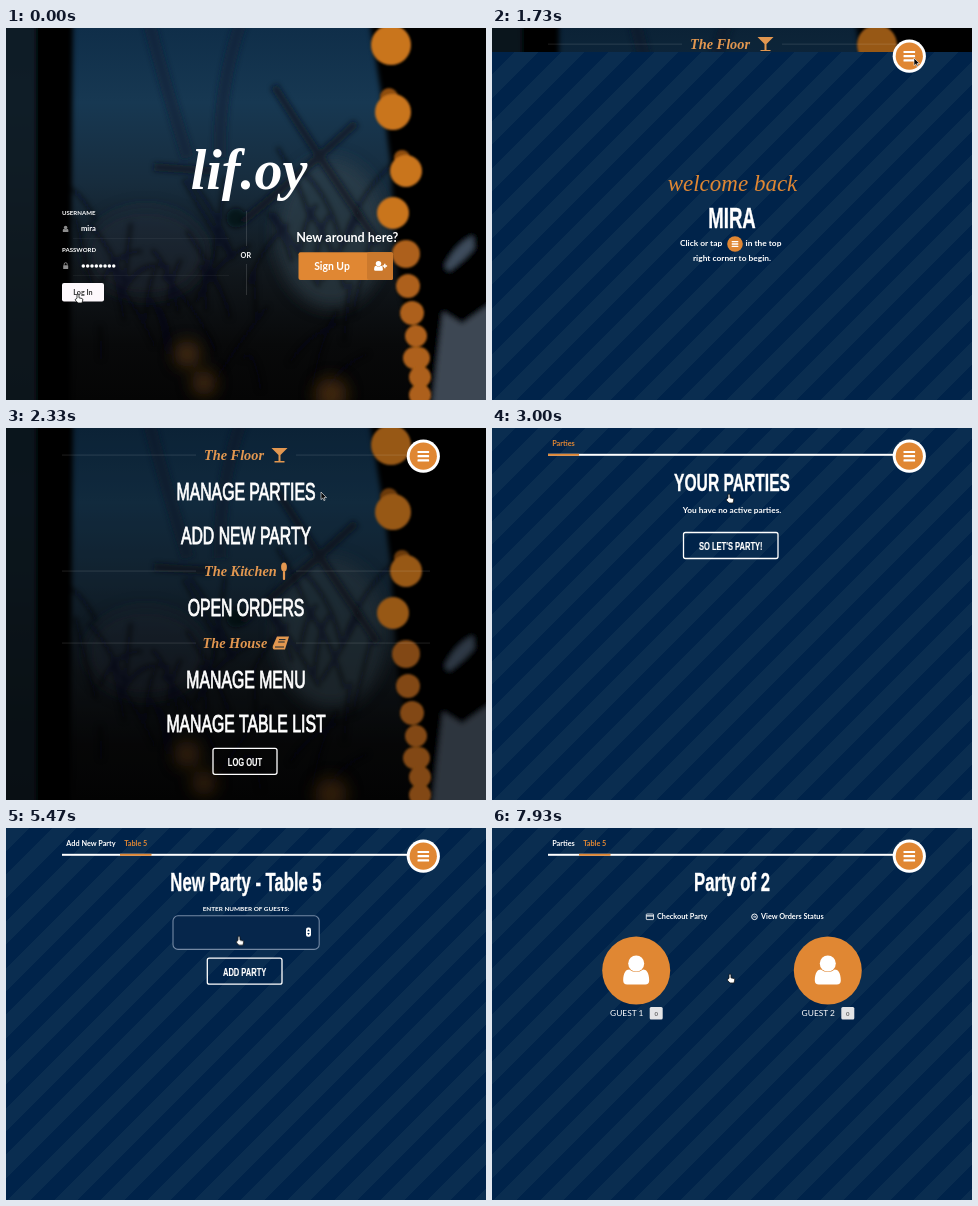
Animation, 480 px wide and 372 px high, one loop 8000 ms. Source, as an HTML page:

```html
<!DOCTYPE html>
<html lang="en">
<head>
<meta charset="utf-8">
<title>Restaurant floor app</title>
<style>
html, body { margin: 0; width: 100%; height: 100%; overflow: hidden; background: #00234a; }
#stage { position: relative; width: 480px; height: 372px; overflow: hidden;
  background: repeating-linear-gradient(135deg, #0a2d50 0 16.5px, #00234a 16.5px 33px); }
.layer { position: absolute; left: 0; top: 0; width: 480px; height: 372px; }
text { font-family: Lato, sans-serif; font-weight: 700; fill: #fff; }
.cond { font-family: "Liberation Sans", Arial, sans-serif; text-anchor: middle;
  stroke: #fff; stroke-width: .016em; }
.thin { font-weight: 400; stroke-width: .04em; }
.script { font-family: "Liberation Serif", serif; font-style: italic; }
.mid { text-anchor: middle; }
.plain { font-weight: 400; }
</style>
</head>
<body>
<div id="stage"></div>
<script>
const LOOP = 8000, ORANGE = '#e08733', NAVY = '#00234a';
const stage = document.getElementById('stage');

// Drawing helpers, each returning SVG markup
const text = (x, y, size, str, cls = '', fill = '#fff') =>
  `<text x="${x}" y="${y}" font-size="${size}" class="${cls}" style="fill:${fill}">${str}</text>`;
const cond = (x, y, size, str, cls = '') =>
  `<text class="cond ${cls}" font-size="${size}" transform="translate(${x} ${y}) scale(.64 1)">${str}</text>`;
const rect = (x, y, w, h, fill, r = 0, extra = '') =>
  `<rect x="${x}" y="${y}" width="${w}" height="${h}" rx="${r}" fill="${fill}" ${extra}/>`;
const circle = (x, y, r, fill, extra = '') =>
  `<circle cx="${x}" cy="${y}" r="${r}" fill="${fill}" ${extra}/>`;
const path = (d, fill, extra = '') => `<path d="${d}" fill="${fill}" ${extra}/>`;
const line = (d, color, width, opacity = 1) =>
  path(d, 'none', `stroke="${color}" stroke-width="${width}" opacity="${opacity}"`);
const group = (x, y, body, scale = 1) =>
  `<g transform="translate(${x} ${y}) scale(${scale})">${body}</g>`;
const outlined = (x, y, w, label) =>
  rect(x, y, w, 26, 'none', 2, 'stroke="#fff" stroke-width="1.3"') +
  cond(x + w / 2, y + 17.4, 11.8, label);
const user = (x, y, scale, fill) => group(x, y, circle(0, -7, 8, fill) +
  path('M-13 10c0-8 3-11 6-11q7 5 14 0c3 0 6 3 6 11q0 4-4 4h-18q-4 0-4-4z', fill), scale);
const burger = (x, y, scale) => group(x, y,
  [-4.2, 0, 4.2].map(dy => rect(-5.8, dy - 1.1, 11.6, 2.2, '#fff', .6)).join(''), scale);

function layer(body) {
  stage.insertAdjacentHTML('beforeend', `<svg class="layer" viewBox="0 0 480 372">${body}</svg>`);
  return stage.lastElementChild;
}

// steps: [ms, value, easing?]; the ends of the loop are held
function track(el, prop, steps) {
  const all = [[0, steps[0][1]], ...steps, [LOOP, steps[steps.length - 1][1]]];
  el.animate(all.map(([ms, value, easing = 'linear']) =>
    ({ offset: ms / LOOP, [prop]: value, easing })), { duration: LOOP, iterations: Infinity });
}
const show = (el, from, to, fadeIn = 0, fadeOut = 0) => track(el, 'opacity',
  [[from, 0], [from + fadeIn, 1], [to, 1], [to + fadeOut, 0]]);

function photo() {
  let seed = 11;
  const rnd = () => (seed = seed * 16807 % 2147483647) / 2147483647;
  let twigs = '';
  for (let i = 0; i < 40; i++) {
    const x = 90 + rnd() * 270, y = 190 + rnd() * 180, dx = rnd() * 110 - 55;
    twigs += `M${x} ${y}q${dx / 3} ${-20 - rnd() * 30} ${dx} ${-30 - rnd() * 60}`;
  }
  const bulbs = [[385, 17, 20], [387, 84, 18], [400, 143, 16], [387, 185, 16], [400, 226, 14],
    [402, 258, 12], [406, 285, 12], [410, 308, 11], [413, 330, 11], [408, 330, 11], [414, 349, 11],
    [414, 367, 11]];
  const ember = (x, y, r) => circle(x, y, r, '#6b4012', 'opacity=".6"');
  return rect(0, 0, 480, 372, 'url(#sky)') +
    '<g filter="url(#haze)">' +
    '<ellipse cx="325" cy="205" rx="55" ry="75" fill="#34434f" opacity=".6"/>' +
    '<ellipse cx="140" cy="225" rx="60" ry="45" fill="#28333c" opacity=".4"/></g>' +
    '<g filter="url(#blur)">' +
    line(twigs, '#080d12', 4, .5) +
    line('M142-9Q160 60 182 130M236-9Q212 60 214 130', '#0d2233', 13, .55) +
    line('M148 139L206 143M268 58Q320 140 372 215M235 195Q290 150 350 95', '#0b1721', 8, .65) +
    circle(230, 190, 10, '#070c11', 'opacity=".7"') +
    rect(-9, -9, 39, 390, '#0a1522', 0, 'opacity=".85"') +
    path('M30-9H67L64 380H30z', '#030405') +
    path('M363-9L376 70 384 130 392 250 420 380H490V-9z', '#040506') +
    path('M437 284L456 296 490 272V380H426z', '#3c4753') +
    path('M439 238Q450 216 467 208L468 220Q458 232 443 243z', '#3d4b5b') + '</g>' +
    '<g filter="url(#haze)">' + ember(181, 326, 13) + ember(198, 355, 12) + ember(325, 366, 16) + '</g>' +
    '<g filter="url(#soft)">' +
    circle(383, 69, 9, '#8f4d11') + circle(396, 130, 8, '#8f4d11') +
    bulbs.map(([x, y, r], i) => circle(x, y, r, i < 4 ? '#c9751f' : '#ad611a')).join('') + '</g>';
}

layer(`<defs>
  <linearGradient id="sky" x2="0" y2="1">
    <stop offset="0" stop-color="#0f2e49"/><stop offset=".2" stop-color="#173852"/>
    <stop offset=".42" stop-color="#172c3d"/><stop offset=".65" stop-color="#11171c"/>
    <stop offset=".85" stop-color="#08090a"/><stop offset="1" stop-color="#050505"/>
  </linearGradient>
  <filter id="blur"><feGaussianBlur stdDeviation="2.5"/></filter>
  <filter id="haze" x="-50%" y="-50%" width="200%" height="200%"><feGaussianBlur stdDeviation="8"/></filter>
  <filter id="soft"><feGaussianBlur stdDeviation=".8"/></filter>
</defs>`);

// Striped pages: tabs switch hard, the content fades in
function page(from, to, fade, tabs, active, content) {
  let x = 56;
  let bar = tabs.length ? rect(56, 25.8, 346, 2, '#fff') : '';
  tabs.forEach(([label, width], i) => {
    const on = i === active;
    bar += text(x + width / 2, 18, 7.3, label, 'mid', on ? ORANGE : '#fff');
    if (on) bar += rect(x, 25.8, width, 2, ORANGE);
    x += width;
  });
  show(layer(bar), from, to);
  const el = layer(content);
  show(el, from, to, fade);
  return el;
}
const PARTIES = ['Parties', 31], ADD = ['Add New Party', 58], TABLE = ['Table 5', 31.5];

page(400, 2670, 500, [], 0,
  text(240.5, 163, 23, 'welcome back', 'script mid plain', ORANGE) +
  cond(240, 200, 29, 'MIRA') +
  text(188, 218, 8.4, 'Click or tap') + circle(243, 216, 7.8, ORANGE) + burger(243, 216, .58) +
  text(253.5, 218, 8.4, 'in the top') + text(240, 233, 8.4, 'right corner to begin.', 'mid'));

page(2670, 3600, 200, [PARTIES], 0,
  cond(240, 62.5, 24.4, 'YOUR PARTIES') +
  text(240, 85, 8.3, 'You have no active parties.', 'mid') +
  outlined(191.5, 104.5, 94.5, "SO LET'S PARTY!"));

const table = (x, name, seats, fill) =>
  `<ellipse cx="${x}" cy="108" rx="32.6" ry="31" fill="${fill}" stroke="${ORANGE}" stroke-width=".9"/>` +
  text(x, 103, 9.4, name, 'mid', '#17171a') +
  text(x, 112.3, 7.1, `Seats: ${seats}`, 'mid plain', '#4c4641') +
  rect(x - 32, 122.3, 64, 15.8, ORANGE, 1) + text(x, 132.5, 6.2, 'Free', 'mid');
const tables = page(3600, 5000, 400, [ADD], 0,
  cond(240, 63, 26, 'Select a Table') +
  table(199.7, 'Table 5', 8, '#f5dcc5') +
  `<g class="hover">${table(199.7, 'Table 5', 8, '#cfbfb2')}</g>` +
  table(280.2, 'Table 1', 4, '#f5dcc5'));
show(tables.querySelector('.hover'), 4330, 5000, 150);

const form = page(5000, 7050, 350, [ADD, TABLE], 1,
  cond(240, 63, 26, 'New Party - Table 5') +
  text(240, 82.5, 6.4, 'ENTER NUMBER OF GUESTS:', 'mid') +
  rect(167, 87.8, 146.2, 33.6, '#06264b', 5, 'stroke="#7489a4" stroke-width="1.1"') +
  `<g class="value">${text(236, 109, 13.5, '2', 'mid plain')}</g>` +
  `<g class="caret">${rect(239.6, 97, .9, 15, '#d5dde6')}</g>` +
  rect(300, 99.5, 5, 9.2, '#fff', 2) +
  path('M301.2 103.2l1.3-2 1.3 2zM301.2 105l1.3 2 1.3-2z', NAVY) +
  outlined(201.3, 130.2, 74.7, 'ADD PARTY'));
show(form.querySelector('.value'), 6000, 7050);
show(form.querySelector('.caret'), 5670, 7050);

const guest = (x, n) => circle(x, 142.5, 34, ORANGE) + user(x, 142.5, 1, '#fff') +
  text(x - 9.5, 188, 8.4, `GUEST ${n}`, 'mid plain') +
  rect(x + 13.5, 179, 13, 12.6, '#e3e4e6', 1.5) + text(x + 20, 187.6, 6, '0', 'mid', '#666');
page(7050, LOOP, 450, [PARTIES, TABLE], 1,
  cond(240, 63, 26, 'Party of 2') +
  rect(154.3, 86, 7.2, 5.6, 'none', .6, 'stroke="#fff" stroke-width=".8"') +
  rect(154.3, 87.3, 7.2, 1.2, '#fff') + text(165, 91.4, 7.3, 'Checkout Party') +
  circle(262.5, 88.8, 2.8, 'none', 'stroke="#fff" stroke-width="1"') +
  line('M261 88.8h2.6m-1.1-1.2l1.2 1.2-1.2 1.2', '#fff', .7) +
  text(269, 91.4, 7.3, 'View Orders Status') + guest(144.2, 1) + guest(335.8, 2));

// Drop-down menu
const heading = (y, x, label, icon, iconX) =>
  rect(56, y - .3, 134, .7, '#fff', 0, 'opacity=".17"') +
  rect(290, y - .3, 134, .7, '#fff', 0, 'opacity=".17"') +
  text(x, y + 5, 14.3, label, 'script', '#e29750') + group(iconX, y, icon);
const martini = path('M-8-7H8L1 0V6h4v1.5H-5V6h4V0z', '#e29750');
const spoon = '<ellipse cy="-4" rx="2.9" ry="4.5" fill="#e29750"/>' + rect(-1.1, 0, 2.2, 9, '#e29750', 1);
const book = path('M-4-6.5H8L4 6.5H-7q-2-1-1-4z', '#e29750') +
  line('M-2-3.4H4.5M-2.8-1H3.7M-6 4H3', '#17242e', 1);
const items = [[63, 'MANAGE PARTIES'], [107, 'ADD NEW PARTY'], [179, 'OPEN ORDERS'],
  [251, 'MANAGE MENU'], [295, 'MANAGE TABLE LIST']];
const menu = layer(photo() + rect(0, 0, 480, 372, '#000', 0, 'opacity=".25"') + '<g class="list">' +
  heading(27, 198, 'The Floor', martini, 273.5) +
  heading(143, 198, 'The Kitchen', spoon, 278) +
  heading(215, 196.5, 'The House', book, 275) +
  items.map(([y, label]) => cond(240, y + 9.2, 24.7, label, 'thin')).join('') +
  outlined(207, 320.3, 64, 'LOG OUT') + '</g>');
const clip = bottom => `inset(0px 0px ${bottom}px 0px)`;
track(menu, 'clipPath', [[1665, clip(372)], [1730, clip(349), 'ease-in-out'], [2130, clip(0)],
  [2670, clip(0), 'ease-in-out'], [2970, clip(372)]]);
track(menu.querySelector('.list'), 'transform', [[1730, 'translate(0px,-11px)', 'ease-out'],
  [2130, 'translate(0px,0px)'], [2670, 'translate(0px,0px)', 'ease-in-out'], [2970, 'translate(0px,-11px)']]);

layer(circle(417.3, 28.2, 16.6, '#fff') + circle(417.3, 28.2, 13.6, ORANGE) + burger(417.3, 28.2, 1));

// Sign-in screen
const dots = Array.from({ length: 8 }, (_, i) => circle(77.3 + i * 4.35, 238, 1.75, '#fff')).join('');
const signIn = layer(photo() +
  text(243, 161, 56, 'lif.oy', 'script mid') +
  text(56, 187, 6.1, 'USERNAME') + user(59.6, 201, .22, '#8d8d8d') + text(75, 203.4, 7.6, 'mira') +
  rect(67, 210, 156, .6, '#fff', 0, 'opacity=".08"') +
  text(56, 224, 6.1, 'PASSWORD') + rect(57.2, 237.3, 5, 3.8, '#8d8d8d', .5) +
  line('M58.2 237.5v-1.3a1.5 1.5 0 0 1 3 0v1.3', '#8d8d8d', .9) + dots +
  rect(67, 247, 156, .6, '#fff', 0, 'opacity=".08"') +
  rect(56, 255, 42, 18.6, '#fdf8fc', 2) + text(77, 267, 7.2, 'Log In', 'mid', '#333') +
  rect(240, 183, .7, 35, '#fff', 0, 'opacity=".2"') + rect(240, 236, .7, 31, '#fff', 0, 'opacity=".2"') +
  text(239.8, 230, 7.2, 'OR', 'mid') +
  text(341.3, 213.5, 12.6, 'New around here?', 'mid') +
  rect(292.5, 224.3, 94.5, 27.6, ORANGE, 2) + rect(361, 224.3, 26, 27.6, '#cb792d', 2) +
  text(326, 242, 10.4, 'Sign Up', 'mid') + user(372.5, 238, .34, '#fff') +
  line('M376.5 238h4.6m-2.3-2.3v4.6', '#fff', 1.4));
track(signIn, 'opacity', [[300, 1], [550, 0]]);

// Pointer
const pointer = layer('<g class="at">' +
  `<g class="hand">${path('M-1 4V1a1 1 0 0 1 2 0v2.8l3 .7q1 .3 .8 1.4L4 9H0L-2.8 6q-.2-1 .9-.8z',
    '#fff', 'stroke="#111" stroke-width=".8"')}</g>` +
  `<g class="arrow">${path('M0 0v7.6l1.8-1.6 1.1 2.6 1.2-.5-1.1-2.5h2.5z',
    '#050505', 'stroke="#fff" stroke-width=".6"')}</g></g>`);
const moves = [[350, 72, 266], [900, 290, 150], [1450, 417, 42], [1640, 422, 30], [1760, 422, 30],
  [2330, 315, 64], [2560, 237, 66], [3000, 237, 66], [3350, 238, 115], [4050, 238, 115],
  [4500, 220, 119], [5250, 220, 119], [5600, 238, 104], [6050, 238, 104], [6530, 234, 136],
  [6700, 238, 146]];
track(pointer.querySelector('.at'), 'transform',
  moves.map(([ms, x, y]) => [ms, `translate(${x}px,${y}px)`, 'ease-in-out']));
show(pointer.querySelector('.arrow'), 420, 2450);
track(pointer.querySelector('.hand'), 'opacity', [[420, 1], [420, 0], [2450, 0], [2450, 1]]);
</script>
</body>
</html>
```
